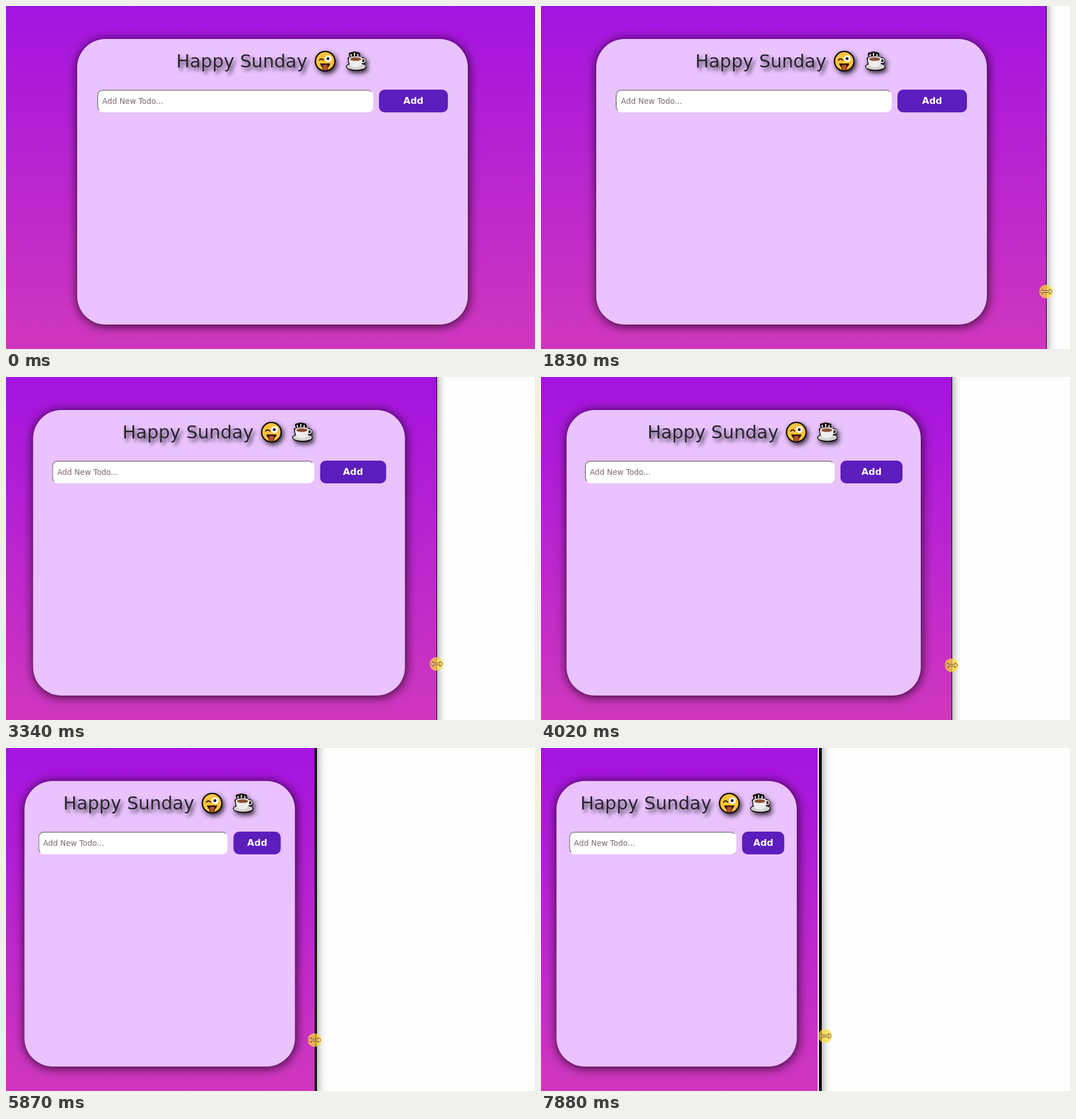
Write an HTML page that moves like this. It is 929 px wide and 603 px high and loops after 8 s.

```html
<!DOCTYPE html>
<html lang="en">
<head>
<meta charset="utf-8">
<title>Resizing todo window</title>
<style>
  html, body { margin: 0; width: 100%; height: 100%; overflow: hidden; background: #fefefe; }
  body { position: relative; font-family: "DejaVu Sans", Verdana, sans-serif; }
  div, svg { position: absolute; box-sizing: border-box; }
  #page { left: 0; top: 0; height: 603px; overflow: hidden; background: linear-gradient(#a413e0, #d037be); }
  #layout { left: 0; top: 0; height: 603px; }
  #card {
    left: 50%; top: 57.5px; height: 502px; width: min(686px, 85% + 17px);
    transform: translateX(-50%); border-radius: 50px; background: #e9c2fe;
    box-shadow: 1px 2px 18px 1px rgba(0, 0, 0, .75);
  }
  #title { left: calc(50% - 170px); top: 8.5px; overflow: visible; }
  #title text { font-size: 31.6px; fill: #2a2530; text-shadow: 4px 5px 6px rgba(0, 0, 0, .65); }
  #title > g { filter: drop-shadow(3px 4px 4px rgba(0, 0, 0, .8)); }
  #row { left: 5.1%; right: 5.1%; top: 89.5px; height: 40px; display: flex; gap: 10px; line-height: 40px; }
  #row div { position: static; white-space: nowrap; border-radius: 10px; }
  #field {
    flex: 1; padding-left: 7px; line-height: 37px; font-size: 13.4px; color: #7b6872; background: #fff;
    border: 2px solid; border-color: #979099 #fff #fff #979099;
  }
  #add {
    flex: 0 0 calc((100% - 10px) * .2); text-align: center;
    font-size: 16px; font-weight: bold; color: #fff; background: #5c1dbd;
  }
  #edge { top: 0; height: 603px; background: #000; }
  #shade { top: 0; height: 603px; width: 16px; background: linear-gradient(90deg, rgba(0,0,0,.24), rgba(0,0,0,.07) 50%, transparent); }
  #cursor { left: -12px; top: -12px; }
</style>
</head>
<body>
<div id="page">
  <div id="layout">
    <div id="card">
      <svg id="title" width="340" height="60">
        <text x="1" y="42">Happy Sunday</text>
        <g transform="translate(262.5 31)">
          <circle r="18.3" fill="#0c0806"/>
          <circle r="16" fill="#ffc23a"/>
          <path d="M-10-2Q-6.5-6-3-2" fill="none" stroke="#2b1708" stroke-width="2" stroke-linecap="round"/>
          <circle cx="5.5" cy="-4.5" r="6" fill="#fff"/>
          <circle cx="5" cy="-4.5" r="2.5" fill="#1c120c"/>
          <path d="M-9 4H9Q7 12 0 12T-9 4Z" fill="#2e1409"/>
          <path d="M-4.5 6H4.5V12A4.5 4.5 0 0 1-4.5 12Z" fill="#b5502f" stroke="#3d1709"/>
        </g>
        <g transform="translate(317 31)">
          <g fill="#0c0806" stroke="#0c0806" stroke-width="4" stroke-linejoin="round">
            <path d="M-10-9L-11-13L-7-14L-3-15L1-14L5-13L5-9Z"/>
            <path d="M-13-5H11C16-6 18 3 10 5L16 10Q14 15 0 15T-16 9L-11 5Z"/>
          </g>
          <ellipse cy="9.5" rx="16.5" ry="5.8" fill="#d3d1d2"/>
          <circle cx="12" cy="-1" r="3.6" fill="#0c0806" stroke="#e5e3e4" stroke-width="2"/>
          <path d="M-13-4C-13 7-8 11-1 11S11 7 11-4Z" fill="#efedee"/>
          <ellipse cx="-1" cy="-4" rx="12" ry="4.6" fill="#f7f5f5"/>
          <ellipse cx="-1" cy="-3.6" rx="9.8" ry="3.2" fill="#8c5036"/>
          <path d="M-9-9v-3M-3-10v-4M3-9v-3" stroke="#e9e4e4" stroke-width="2.2" stroke-linecap="round"/>
        </g>
      </svg>
      <div id="row">
        <div id="field">Add New Todo...</div>
        <div id="add">Add</div>
      </div>
    </div>
  </div>
</div>
<div id="edge"></div>
<div id="shade"></div>
<svg id="cursor" width="24" height="24" viewBox="-12 -12 24 24">
  <circle r="12" fill="#ffdc36" fill-opacity=".72"/>
  <path d="M-11 0L-6-4.5V-1.5H6V-4.5L11 0L6 4.5V1.5H-6V4.5Z" fill="#fff" fill-opacity=".3" stroke="#74401c"/>
</svg>
<script>
const LOOP = 8000, START = 1147, TICK = 168;
const RELEASE = 38, PEAK = 28, WAVE = 19;

// Drag path: [tick, window edge, layout width]
const PATH = [
  [-1, 945, 936], [4, 888, 879], [9, 822, 815], [13, 757, 748], [17, 722, 712],
  [20, 692, 683], [24, 632, 627], [28, 546, 539], [34, 487, 476]
];

const style = id => document.getElementById(id).style;
const [page, layout, edge, shade, cursor] =
  ["page", "layout", "edge", "shade", "cursor"].map(style);
const px = value => value + "px";

function dragAt(tick) {
  const t = Math.min(tick, PATH[PATH.length - 1][0]);
  const i = Math.max(1, PATH.findIndex(point => point[0] >= t));
  const [t0, right0, width0] = PATH[i - 1], [t1, right1, width1] = PATH[i];
  const k = (t - t0) / (t1 - t0);
  return [Math.round(right0 + (right1 - right0) * k), width0 + (width1 - width0) * k];
}

function draw() {
  const time = performance.now() % LOOP;
  const tick = Math.max(-1, Math.floor((time - START) / TICK));
  const released = tick >= RELEASE;
  const [dragged, width] = dragAt(tick);
  const right = released ? dragged + 5.5 : dragged;

  // The painted page trails the window edge in a slow wave, leaving a black strip.
  const wave = Math.max(0, Math.cos((tick - PEAK) / WAVE * 2 * Math.PI));
  const strip = released ? 4.5 : Math.round(1 + 3 * wave * wave);
  const x = right - strip + (released ? 11 : 0);
  const y = 502 + .6 * Math.max(0, WAVE - Math.abs(tick - PEAK));

  page.width = px(released ? dragged - 1 : right - strip);
  layout.width = px(width);
  edge.left = px(right - strip);
  edge.width = px(strip);
  shade.left = px(right);
  cursor.transform = `translate(${x}px, ${y}px)`;
  requestAnimationFrame(draw);
}
draw();
</script>
</body>
</html>
```
